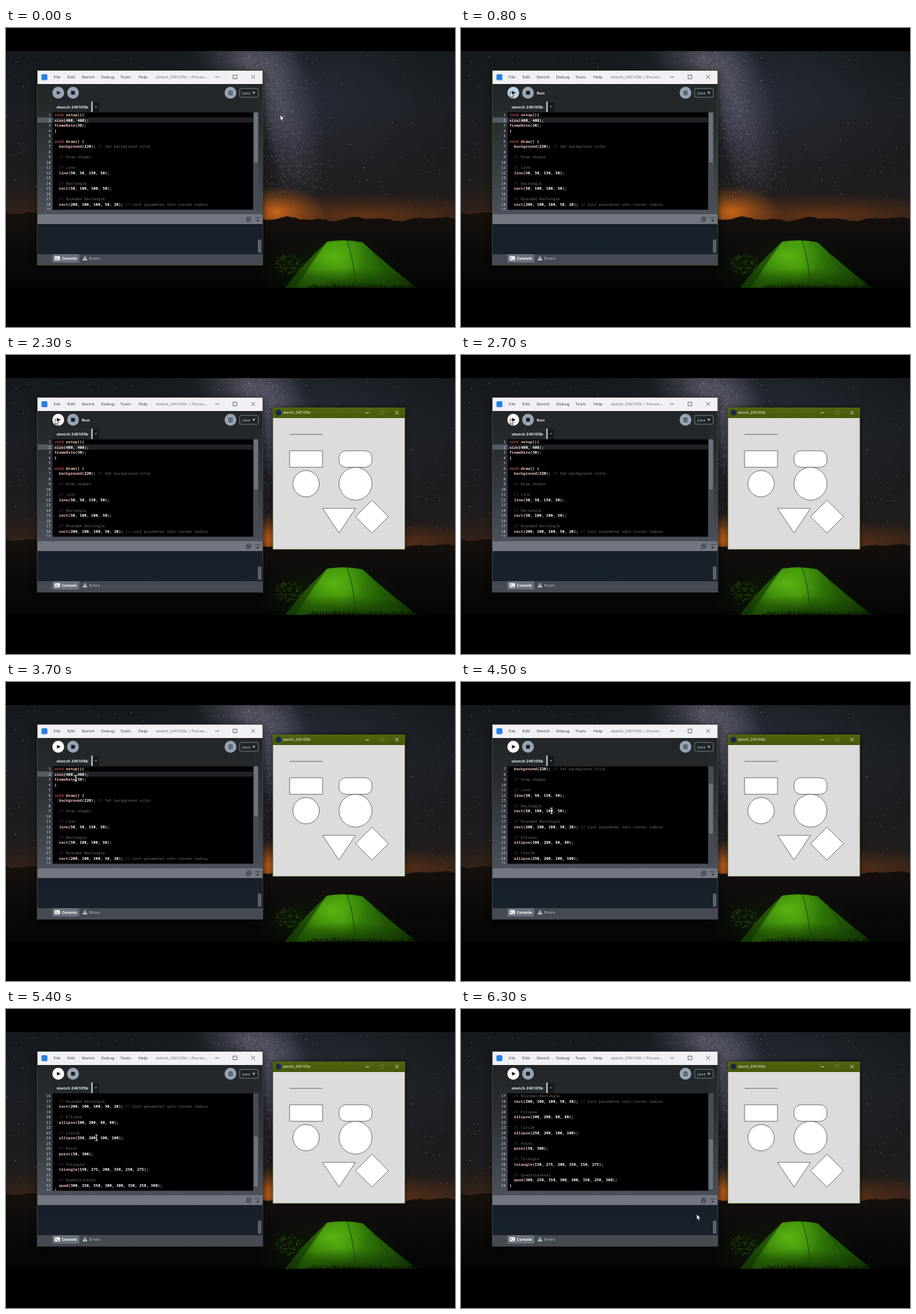
An HTML page with a canvas that plays this animation: 640x427 px, repeating every 6.4 s.

```html
<!DOCTYPE html>
<html lang="en">
<head>
<meta charset="utf-8">
<title>Sketch demo</title>
<style>
  html, body { margin: 0; width: 100%; height: 100%; overflow: hidden; background: #000; }
  canvas { display: block; width: 640px; height: 427px; }
</style>
</head>
<body>
<canvas id="stage" width="640" height="427"></canvas>
<script>
const W = 640, H = 427, LOOP = 6400, STEP = 100;
const SANS = '"Noto Sans", "Open Sans", sans-serif';
const MONO = '"Noto Sans Mono", "DejaVu Sans Mono", monospace';
const CHAR = 3.27, ROW = 7.5;
const RUN = [74.5, 92.5];

const CODE = `void setup(){
size(400, 400);
frameRate(30);
}

void draw() {
  background(220); // Set background color

  // Draw shapes

  // Line
  line(50, 50, 150, 50);

  // Rectangle
  rect(50, 100, 100, 50);

  // Rounded Rectangle
  rect(200, 100, 100, 50, 20); // Last parameter sets corner radius

  // Ellipse
  ellipse(100, 200, 80, 80);

  // Circle
  ellipse(250, 200, 100, 100);

  // Point
  point(50, 300);

  // Triangle
  triangle(150, 275, 200, 350, 250, 275);

  // Quadrilateral
  quad(300, 250, 350, 300, 300, 350, 250, 300);
}`.split('\n');

// Pointer path: time, x, y
const PATH = [[0, 391, 124], [300, 318, 134], [700, 105, 131], [800, 70, 91],
  [3400, 70, 91], [4000, 129, 184], [5600, 129, 184], [6300, 336, 293]];
// Wheel notches: time, first visible row
const NOTCHES = [[4200, 3], [4400, 6], [4700, 9], [5000, 12], [5300, 15], [5600, 16]];

let g = document.getElementById('stage').getContext('2d');

function rect(x, y, w, h, fill) {
  g.fillStyle = fill;
  g.fillRect(x, y, w, h);
}

function round(x, y, w, h, r, fill, line) {
  g.beginPath();
  g.roundRect(x, y, w, h, r);
  paint(fill, line);
}

function disc(x, y, r, fill, line) {
  g.beginPath();
  g.arc(x, y, r, 0, 7);
  paint(fill, line);
}

function poly(points, fill, line) {
  g.beginPath();
  for (let i = 0; i < points.length; i += 2) g.lineTo(points[i], points[i + 1]);
  g.closePath();
  paint(fill, line);
}

function paint(fill, line) {
  if (fill) { g.fillStyle = fill; g.fill(); }
  if (line) { g.strokeStyle = line; g.stroke(); }
}

function stroke(x1, y1, x2, y2, color, width = 1) {
  g.lineWidth = width;
  g.strokeStyle = color;
  g.beginPath();
  g.moveTo(x1, y1);
  g.lineTo(x2, y2);
  g.stroke();
}

function fade(y1, y2, ...colors) {
  const f = g.createLinearGradient(0, y1, 0, y2);
  colors.forEach((c, i) => f.addColorStop(i / (colors.length - 1), c));
  return f;
}

// Scaled down from a large size so that glyph spacing stays exact
function text(s, x, y, size, color, weight = 400, font = SANS, align = 'left') {
  g.save();
  g.translate(x, y);
  g.scale(0.1, 0.1);
  g.font = `${weight} ${size * 10}px ${font}`;
  g.textAlign = align;
  g.textBaseline = 'alphabetic';
  g.fillStyle = color;
  g.fillText(s, 0, 0);
  g.restore();
}

function glow(x, y, rx, ry, angle, color, alpha) {
  g.save();
  g.translate(x, y);
  g.rotate(angle);
  g.scale(rx, ry);
  const f = g.createRadialGradient(0, 0, 0, 0, 0, 1);
  f.addColorStop(0, `rgba(${color},${alpha})`);
  f.addColorStop(0.5, `rgba(${color},${alpha * 0.45})`);
  f.addColorStop(1, `rgba(${color},0)`);
  g.fillStyle = f;
  g.fillRect(-1, -1, 2, 2);
  g.restore();
}

function random(seed) {
  return () => (seed = (seed * 16807) % 2147483647) / 2147483647;
}

function drawTent() {
  const rnd = random(71);
  glow(460, 345, 110, 50, 0, '30,70,8', 0.35);
  for (let i = 0; i < 170; i++) {
    const a = rnd() * 6.3, r = Math.sqrt(rnd());
    rect(404 + Math.cos(a) * r * 20, 336 + Math.sin(a) * r * 15, 1.6, 1.3, rnd() < 0.35 ? '#2c570b' : '#122506');
  }
  const skin = g.createLinearGradient(405, 0, 585, 0);
  skin.addColorStop(0, '#1d4d06');
  skin.addColorStop(0.2, '#357f09');
  skin.addColorStop(0.42, '#3f930b');
  skin.addColorStop(0.65, '#2b6d07');
  skin.addColorStop(1, '#0f2b03');
  g.beginPath();
  g.moveTo(398, 371);
  g.quadraticCurveTo(425, 335, 458, 305);
  g.quadraticCurveTo(484, 301, 508, 306);
  g.quadraticCurveTo(545, 340, 586, 371);
  g.closePath();
  paint(skin);
  g.save();
  g.clip();
  glow(464, 326, 52, 34, 0, '110,205,22', 0.6);
  glow(485, 376, 110, 34, 0, '5,20,1', 0.9);
  poly([458, 305, 430, 332, 398, 371, 413, 371, 436, 336], 'rgba(14,45,3,.5)');
  g.lineWidth = 1;
  g.strokeStyle = '#184605';
  for (const [x1, mx, x2] of [[459, 431, 414], [486, 496, 498], [508, 535, 556]]) {
    g.beginPath();
    g.moveTo(x1, 303);
    g.quadraticCurveTo(mx, 330, x2, 371);
    g.stroke();
  }
  g.restore();
  for (let x = 430; x < 600; x += 2) {
    stroke(x, 371, x + rnd() * 3 - 1.5, 370 - rnd() * 5, 'rgba(7,14,3,.8)', 1.2);
  }
}

function drawStars(rnd) {
  for (let i = 0; i < 420; i++) {
    const x = rnd() * W, y = 34 + rnd() * 215, s = 0.4 + rnd() * 0.8;
    rect(x, y, s, s, `rgba(205,212,235,${0.12 + rnd() * 0.5})`);
  }
  // Dense, mottled dust along the galactic band
  for (let i = 0; i < 1500; i++) {
    const y = 34 + rnd() * 200;
    const x = 350 + y * 0.27 + (rnd() + rnd() + rnd() - 1.5) * 62;
    const tone = rnd() < 0.5 ? '190,190,215' : '12,12,20';
    rect(x, y, 1 + rnd(), 1 + rnd(), `rgba(${tone},${0.06 + rnd() * 0.2})`);
  }
}

function drawPhoto() {
  const rnd = random(2024);
  rect(0, 0, W, H, '#000');
  g.save();
  g.beginPath();
  g.rect(0, 33, W, 338);
  g.clip();
  rect(0, 33, W, 245, fade(33, 278, '#15191d', '#1a1d22', '#1c1c1e', '#241c18'));
  glow(430, 100, 230, 160, 0, '62,65,82', 0.4);
  glow(345, 45, 85, 50, 0.4, '125,122,140', 0.5);
  glow(390, 105, 55, 150, -0.26, '120,118,142', 0.5);
  glow(374, 175, 14, 80, -0.2, '18,17,24', 0.5);
  glow(510, 268, 230, 32, 0, '150,72,22', 0.55);
  glow(386, 263, 70, 38, 0, '235,115,25', 0.8);
  glow(30, 268, 120, 40, 0, '90,48,22', 0.35);
  drawStars(rnd);
  g.beginPath();
  g.moveTo(0, 371);
  for (let x = 0; x <= W; x += 4) {
    const base = x < 200 ? 262 : 272;
    g.lineTo(x, base + 2 * Math.sin(x / 17) + 1.5 * Math.sin(x / 7.3) + rnd() * 1.5);
  }
  g.lineTo(W, 371);
  paint(fade(262, 371, '#17100c', '#0f0d0c', '#080807', '#040504'));
  drawTent();
  g.restore();
}

function drawChrome() {
  g.save();
  g.shadowColor = 'rgba(0,0,0,.7)';
  g.shadowBlur = 8;
  g.shadowOffsetY = 2;
  rect(45, 61, 321, 278, '#24282b');
  g.restore();

  rect(45, 61, 321, 19, '#f1f1f5');
  round(50.5, 66, 8.5, 8.5, 1.5, '#2582e6');
  [['File', 68], ['Edit', 87.5], ['Sketch', 107.5], ['Debug', 135.5], ['Tools', 163], ['Help', 188.5]]
    .forEach(([s, x]) => text(s, x, 72.3, 6.1, '#444449', 500));
  text('sketch_240105b | Proces...', 213.5, 72.3, 5.9, '#717177');
  stroke(298, 70, 304, 70, '#555', 0.8);
  g.lineWidth = 0.8;
  g.strokeStyle = '#555';
  g.strokeRect(323.8, 67.2, 5.2, 5.2);
  stroke(349.5, 67, 355, 72.5, '#555', 0.8);
  stroke(355, 67, 349.5, 72.5, '#555', 0.8);

  rect(45, 80, 321, 186, fade(80, 266, '#212527', '#2a2e32', '#3a3f46', '#4c515b'));
  rect(67, 80, 286, 40, '#232729');
  disc(95.5, 92.5, 8.4, '#97a4b3');
  rect(92.8, 89.8, 5.4, 5.4, '#17202a');
  disc(320, 92.5, 8.4, '#97a4b3');
  for (const dy of [-2, 0.6, 3]) stroke(316.8, 92.4 + dy, 323.2, 92.4 + dy, '#46525e', 0.6);
  g.lineWidth = 0.8;
  for (const dx of [-1.3, 1.3]) round(318.9 + dx, 89.5, 2.2, 6.2, 1.1, null, '#35404a');
  round(333, 86.3, 26.6, 12.6, 2, '#202427', '#858b92');
  text('Java', 337, 94.7, 6, '#bcc2c8');
  poly([351.3, 91.3, 355.3, 91.3, 353.3, 94.4], '#bcc2c8');

  round(66, 106, 56, 14, [2, 2, 0, 0], '#22282c');
  text('sketch 240105b', 72, 115, 5.9, '#e4e8ec', 600);
  rect(121.7, 105, 1.7, 15, '#dfe3e8');
  rect(124, 106, 8.5, 14, '#15181a');
  poly([126.3, 111.5, 130, 111.5, 128.1, 114], '#777d83');

  rect(45, 266, 321, 14, '#717680');
  g.lineWidth = 0.8;
  g.strokeStyle = '#30353c';
  g.strokeRect(344.5, 270, 4.4, 4.4);
  g.strokeRect(342.8, 272, 4.4, 4.4);
  stroke(355, 271, 363, 271, '#30353c', 0.8);
  poly([359, 273, 361.3, 276, 356.7, 276], '#30353c');

  rect(45, 280, 321, 43, fade(280, 323, '#171f2a', '#18212c'));
  round(359, 302, 5, 19, 1.5, '#5c626b');
  rect(45, 323, 321, 16, '#454a52');
  round(66, 323, 38.5, 12, 2, '#6b717b');
  round(69.2, 325.8, 7.8, 6.2, 1, '#f0f2f5');
  g.lineWidth = 0.8;
  g.strokeStyle = '#4a5059';
  g.beginPath();
  g.moveTo(70.6, 327.4);
  g.lineTo(72.3, 328.9);
  g.lineTo(70.6, 330.4);
  g.stroke();
  stroke(73, 330.6, 75.5, 330.6, '#4a5059', 0.8);
  text('Console', 79.5, 331, 5.5, '#fff', 700);
  poly([112.5, 325.3, 116, 332, 109, 332], '#c0c5cc');
  rect(112.1, 327.4, 0.9, 2.2, '#454a52');
  rect(112.1, 330.2, 0.9, 0.9, '#454a52');
  text('Errors', 118.5, 331, 5.5, '#c3c8cf', 500);
}

function drawCodeLine(line, y) {
  let x = 69;
  for (const part of line.match(/\/\/.*|\w+|\s+|[^\w\s]+?/g) || []) {
    const comment = part.startsWith('//');
    const color = comment ? '#707070'
      : part === 'void' ? '#bd4a60'
      : /^(setup|draw)$/.test(part) ? '#f6c8a4'
      : /^[a-z]/i.test(part) ? '#f0b9bb' : '#f6f6f6';
    if (part.trim()) text(part, x, y, 5.45, color, comment ? 400 : 700, MONO);
    x += part.length * CHAR;
  }
}

function drawEditor(top) {
  rect(66.5, 120.5, 286, 139, '#000');
  rect(352.5, 120.5, 7.5, 139, '#474c54');
  round(353.3, 120.5 + top * 4.1, 5.8, 71.5, 1.5, '#6d737c');
  g.save();
  g.beginPath();
  g.rect(45, 120.2, 308, 139.3);
  g.clip();
  for (let i = top; i < Math.min(CODE.length + 1, top + 19); i++) {
    const y = 124 + (i - top) * ROW;
    if (i === 1) {
      rect(45, y - 3.8, 21.5, ROW, '#555b64');
      rect(66.5, y - 3.8, 286, ROW, '#202124');
    }
    if (i >= CODE.length) continue;
    text(i + 1, 63.8, y + 2, 5.45, '#cfd3d8', 500, MONO, 'right');
    drawCodeLine(CODE[i], y + 2);
  }
  g.restore();
}

function drawRunButton(hover, running) {
  disc(...RUN, 8.4, running ? '#fff' : hover ? '#bdd3e6' : '#97a4b3');
  poly([72.6, 89.8, 78, 92.5, 72.6, 95.2], '#15191d');
  if (hover) text('Run', 108, 94.6, 5.6, '#f2f2f2', 700);
}

function drawSketch() {
  g.save();
  g.shadowColor = 'rgba(0,0,0,.6)';
  g.shadowBlur = 7;
  rect(380, 75, 189, 203, '#46570f');
  g.restore();
  rect(380, 75, 189, 15, fade(75, 90, '#52650f', '#46590c'));
  disc(388.5, 82.3, 4, '#1b2650');
  text('sketch_240105b', 394.3, 84.4, 5.25, '#f4f4f4');
  stroke(512.5, 82.5, 517.5, 82.5, '#f0f0f0', 0.8);
  g.strokeStyle = '#6f7d3c';
  g.strokeRect(533.8, 80, 4.8, 4.8);
  stroke(554.8, 79.8, 559.8, 84.8, '#f0f0f0', 0.8);
  stroke(559.8, 79.8, 554.8, 84.8, '#f0f0f0', 0.8);
  rect(380.7, 90, 187.6, 187.3, '#dcdcdc');

  g.save();
  g.translate(380.7, 89.8);
  g.scale(0.47, 0.47);
  const ink = '#3a3a3a';
  stroke(50, 50, 150, 50, ink, 1.4);
  g.lineWidth = 1.4;
  round(50, 100, 100, 50, 0, '#fff', ink);
  round(200, 100, 100, 50, 20, '#fff', ink);
  disc(100, 200, 40, '#fff', ink);
  disc(250, 200, 50, '#fff', ink);
  poly([150, 275, 200, 350, 250, 275], '#fff', ink);
  poly([300, 250, 350, 300, 300, 350, 250, 300], '#fff', ink);
  g.restore();
}

function pointerAt(t) {
  let i = 1;
  while (i < PATH.length - 1 && PATH[i][0] < t) i++;
  const [t1, x1, y1] = PATH[i - 1], [t2, x2, y2] = PATH[i];
  const k = Math.min(1, (t - t1) / (t2 - t1));
  return [x1 + (x2 - x1) * k, y1 + (y2 - y1) * k];
}

function drawPointer(x, y) {
  if (x > 66 && x < 352 && y > 120 && y < 260) {
    stroke(x, y - 4, x, y + 4, '#fff', 1);
    stroke(x - 1.8, y - 4, x + 1.8, y - 4, '#fff', 0.8);
    stroke(x - 1.8, y + 4, x + 1.8, y + 4, '#fff', 0.8);
    return;
  }
  g.save();
  g.translate(x, y);
  g.lineWidth = 0.6;
  poly([0, 0, 0, 8, 1.8, 6.4, 3.1, 9.3, 4.4, 8.7, 3.1, 5.9, 5.6, 5.7], '#fff', '#111');
  g.restore();
}

const screen = g;
const backdrop = document.createElement('canvas');
backdrop.width = W;
backdrop.height = H;
g = backdrop.getContext('2d');
drawPhoto();
drawChrome();
g = screen;

function draw(t) {
  const [x, y] = pointerAt(t);
  const hover = Math.hypot(x - RUN[0], y - RUN[1]) < 9;
  const open = t >= 2300;
  const top = NOTCHES.reduce((row, [at, to]) => t >= at ? to : row, 0);
  g.drawImage(backdrop, 0, 0);
  g.lineWidth = 0.8;
  g.strokeStyle = open ? '#4c5157' : '#3d5620';
  g.strokeRect(44.6, 60.6, 321.4, 278.2);
  drawEditor(top);
  drawRunButton(hover, t >= 1000);
  if (open) drawSketch();
  drawPointer(x, y);
}

function tick() {
  const t = performance.now() % LOOP;
  draw(Math.floor(t / STEP) * STEP);
  requestAnimationFrame(tick);
}
tick();
</script>
</body>
</html>
```
